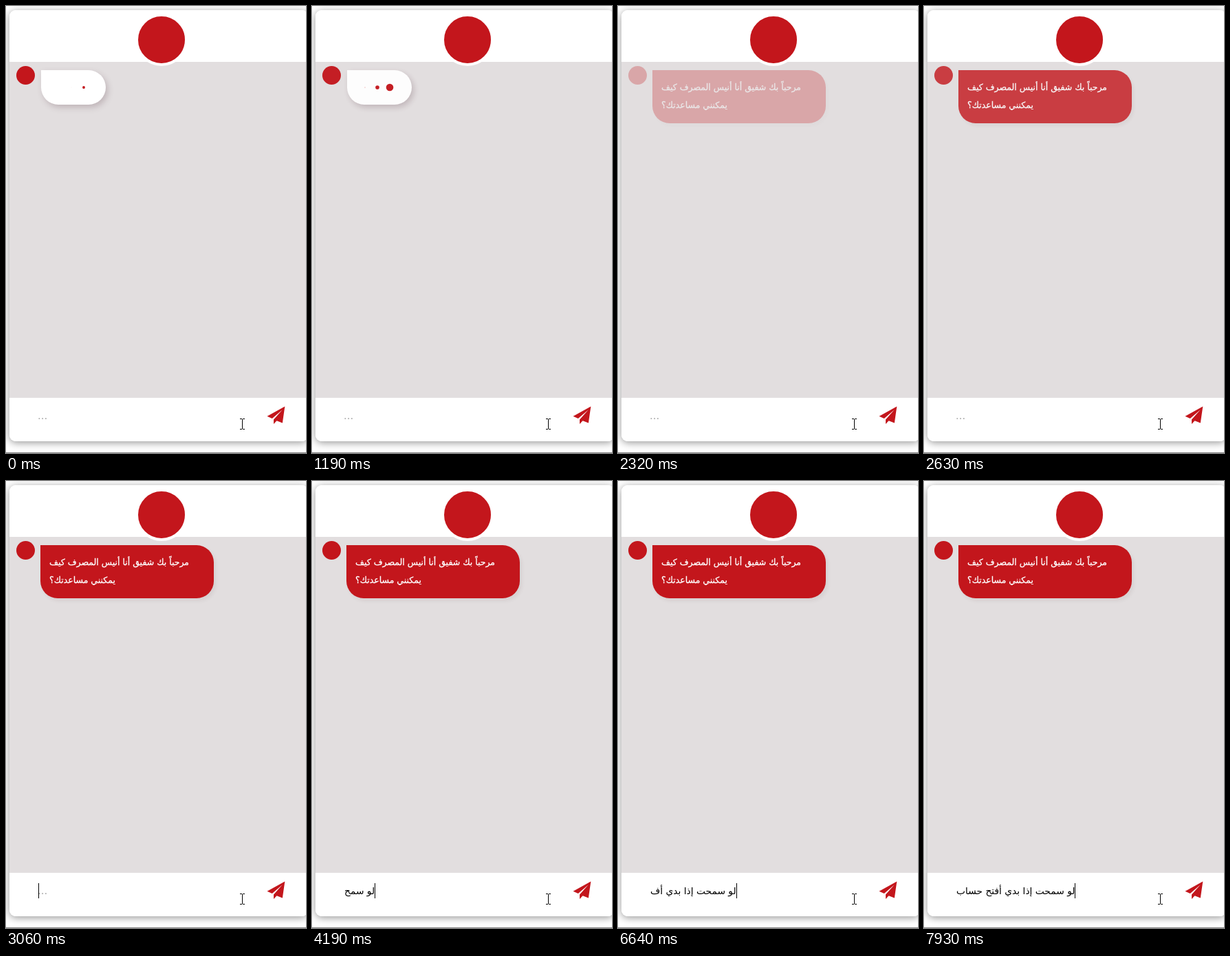
Write an HTML page that moves like this. It is 436 by 648 pixels and loops after 8 s.

```html
<!DOCTYPE html>
<html lang="ar">
<head>
<meta charset="utf-8">
<style>
html, body { margin: 0; width: 100%; height: 100%; overflow: hidden; background: #fff; }
body { position: relative; font-family: "Liberation Sans", "DejaVu Sans", sans-serif; }
body * { box-sizing: border-box; }
.abs, .card, .rule, .logo, .avatar, .bubble, .dot, .line, svg { position: absolute; }
.card { left: 5px; top: 6px; width: 434px; height: 625px; border-radius: 9px; box-shadow: 0 2px 12px rgba(0,0,0,.42);
  background: linear-gradient(#fff 75px, #e2dedf 75px 562px, #fff 562px); }
.rule { left: 0; top: 647px; width: 436px; height: 1px; background: #888; }
.logo { left: 187.5px; top: 10.5px; width: 76px; height: 76px; border-radius: 50%; border: 4.5px solid #fff; background: #c3161c; }
.avatar { left: 15px; top: 87px; width: 27px; height: 27px; border-radius: 50%; background: #c3161c; }
.bubble { top: 93px; border-radius: 0 25px 25px 25px; }
#wait .bubble { left: 51px; width: 94px; height: 50px; background: #fff; box-shadow: 3px 4px 8px rgba(90,60,70,.25); }
#hello .bubble { left: 50px; width: 252px; height: 77px; background: #c3161c; box-shadow: 3px 4px 5px rgba(90,60,70,.08); }
.dot { top: 19px; width: 12px; height: 12px; border-radius: 50%; background: #c3161c; }
.line { left: 13px; white-space: pre; color: #fff; font: 12.5px/26px "DejaVu Sans", sans-serif; -webkit-text-stroke: .3px #fff; }
#hint { left: 46px; top: 583px; font-size: 17px; line-height: 22px; color: #aaa; }
#entry { left: 47px; top: 583px; height: 22px; white-space: pre; font: 13.8px/22px "DejaVu Sans", sans-serif; color: #000; border-right: 1px solid #000; }
</style>
</head>
<body>
<div class="card"></div>
<div class="rule"></div>
<div class="logo"></div>
<div id="wait">
  <div class="avatar"></div>
  <div class="bubble">
    <div class="dot" style="left:20px"></div>
    <div class="dot" style="left:38px"></div>
    <div class="dot" style="left:56px"></div>
  </div>
</div>
<div id="hello">
  <div class="avatar"></div>
  <div class="bubble">
    <div class="line" style="top:12px">مرحباً بك شفيق أنا أنيس المصرف كيف</div>
    <div class="line" style="top:38px">يمكنني مساعدتك؟</div>
  </div>
</div>
<div class="abs" id="hint">...</div>
<div class="abs" id="entry"></div>
<svg style="left:379px;top:580px" width="27" height="27" fill="#c3161c">
  <path d="M26.300 .5L.5 14.800l7.300 3.200L22.500 5.500 10 19.500V26l4.500-4.800 8.300 3.400z"/>
</svg>
<svg style="left:339px;top:598px" width="9" height="16" fill="none" stroke="#000">
  <path d="M1 .5h3M5 .5h3M4.500 1v14M1 15.500h3M5 15.500h3"/>
</svg>
<script>
const LOOP = 8000, BOUNCE = 1400;
const TEXT = "لو سمحت إذا بدي أفتح حساب";
const KEYS = [3360, 3490, 3790, 3930, 4060, 4190, 4340, 4490, 4930, 5230, 5370, 5500, 5650,
  5800, 5940, 6080, 6360, 6640, 6790, 7070, 7210, 7350, 7500, 7800, 7930];
const el = id => document.getElementById(id);
const dots = document.querySelectorAll(".dot");
const clamp = x => Math.min(1, Math.max(0, x));

// Cubic Bezier timing, solved for x by bisection
function bezier(x1, y1, x2, y2) {
  const at = (a, b, u) => 3 * a * u * (1 - u) ** 2 + 3 * b * u * u * (1 - u) + u ** 3;
  return x => {
    let lo = 0, hi = 1;
    for (let i = 0; i < 20; i++) {
      const mid = (lo + hi) / 2;
      if (at(x1, x2, mid) < x) lo = mid; else hi = mid;
    }
    return at(y1, y2, lo);
  };
}
const ease = bezier(.25, .1, .25, 1), easeInOut = bezier(.42, 0, .58, 1);

function draw(t) {
  el("wait").style.opacity = 1 - ease(clamp((t - 1130) / 1000));
  el("hello").style.opacity = ease(clamp((t - 2130) / 1000));
  dots.forEach((dot, i) => {
    const p = (t + 900 + (2 - i) * 160) % BOUNCE / BOUNCE;
    const scale = easeInOut(clamp(1 - Math.abs(p - .4) / .4));
    dot.style.transform = `scale(${scale})`;
  });
  const typed = KEYS.filter(k => k <= t).length;
  el("entry").textContent = TEXT.slice(0, typed);
  el("entry").style.visibility = t < 2920 ? "hidden" : "visible";
  el("hint").style.visibility = typed ? "hidden" : "visible";
}

function frame(now) {
  draw(now % LOOP);
  requestAnimationFrame(frame);
}
draw(0);
requestAnimationFrame(frame);
</script>
</body>
</html>
```
